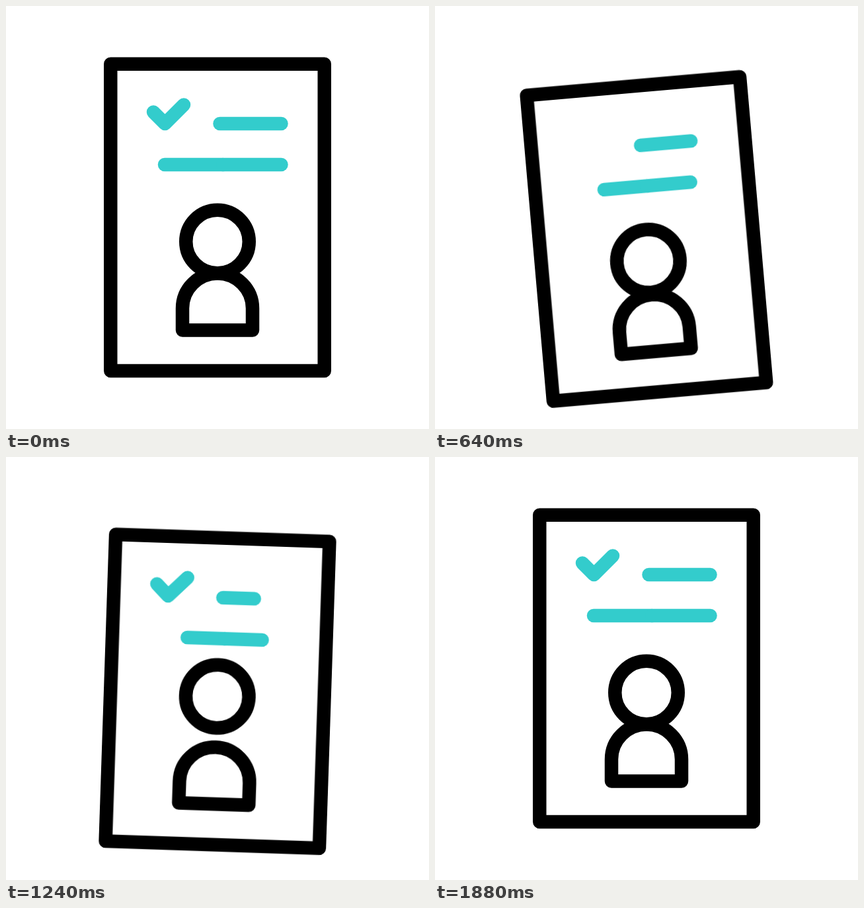
An HTML page for the animation above (1.96 s loop, 640 by 640 pixels).

```html
<!DOCTYPE html>
<html lang="en">
<head>
<meta charset="utf-8">
<title>Checked profile card</title>
<style>
  html, body { margin: 0; height: 100%; overflow: hidden; background: #fff; }
  svg { display: block; width: 100%; height: 100%; }
  svg * {
    animation-duration: 1960ms;
    animation-iteration-count: infinite;
    animation-timing-function: cubic-bezier(.6, 0, .4, 1);
  }

  .ink, .accent {
    fill: none;
    stroke: #000;
    stroke-width: 20.5;
    stroke-linecap: round;
    stroke-linejoin: round;
  }
  .accent { stroke: #3cc; }

  .drop { animation-name: drop; }
  .tilt { animation-name: tilt; transform-origin: 320px 320px; }
  .head { animation-name: hop; }
  .short { stroke-dasharray: 93 200; animation-name: short; }
  .half { stroke-dasharray: 88.25 200; animation-name: half; }
  .check { stroke-dasharray: 65.1 200; animation-name: check; }

  @keyframes drop {
    0%, 2.041%, 95.918%, 100% { transform: translateY(0); }
    48.98% { transform: translateY(40px); }
  }
  @keyframes tilt {
    0%, 2.041%, 95.918%, 100% { transform: rotate(0deg); }
    30.612% { transform: rotate(-5deg); }
    67.347% { transform: rotate(2deg); }
  }
  @keyframes hop {
    0%, 24.49%, 85.714%, 100% { transform: translateY(0); }
    55.102% { transform: translateY(-32px); }
  }
  @keyframes short {
    0%, 18.367%, 90.816%, 100% { stroke-dashoffset: 0; }
    52.041% { stroke-dashoffset: 51.5; }
  }
  @keyframes half {
    0%, 14.286%, 85.714%, 100% { stroke-dashoffset: 0; }
    48.98%, 51.02% { stroke-dashoffset: 39.25; }
  }
  /* Erased from its start, then drawn again from its start */
  @keyframes check {
    0%, 6.122% { stroke-dashoffset: 0; }
    32.652% { stroke-dashoffset: -66; }
    32.653% { stroke-dashoffset: 66; }
    59.184%, 100% { stroke-dashoffset: 0; }
  }
</style>
</head>
<body>
<svg viewBox="0 0 640 640">
  <g class="drop">
    <g class="tilt">
      <rect class="ink" x="158.25" y="87.75" width="323.5" height="464.25"/>
      <path class="accent check" d="M223 160.5 L240.5 178 L269 149.5"/>
      <path class="accent short" d="M323.5 178 H416.5"/>
      <path class="accent half" d="M328.25 240 H240"/>
      <path class="accent half" d="M328.25 240 H416.5"/>
      <path class="ink" d="M267 490.5 V457.5 A53 53 0 0 1 373 457.5 V490.5 Z"/>
      <circle class="ink head" cx="320" cy="356.5" r="47.75"/>
    </g>
  </g>
</svg>
</body>
</html>
```
